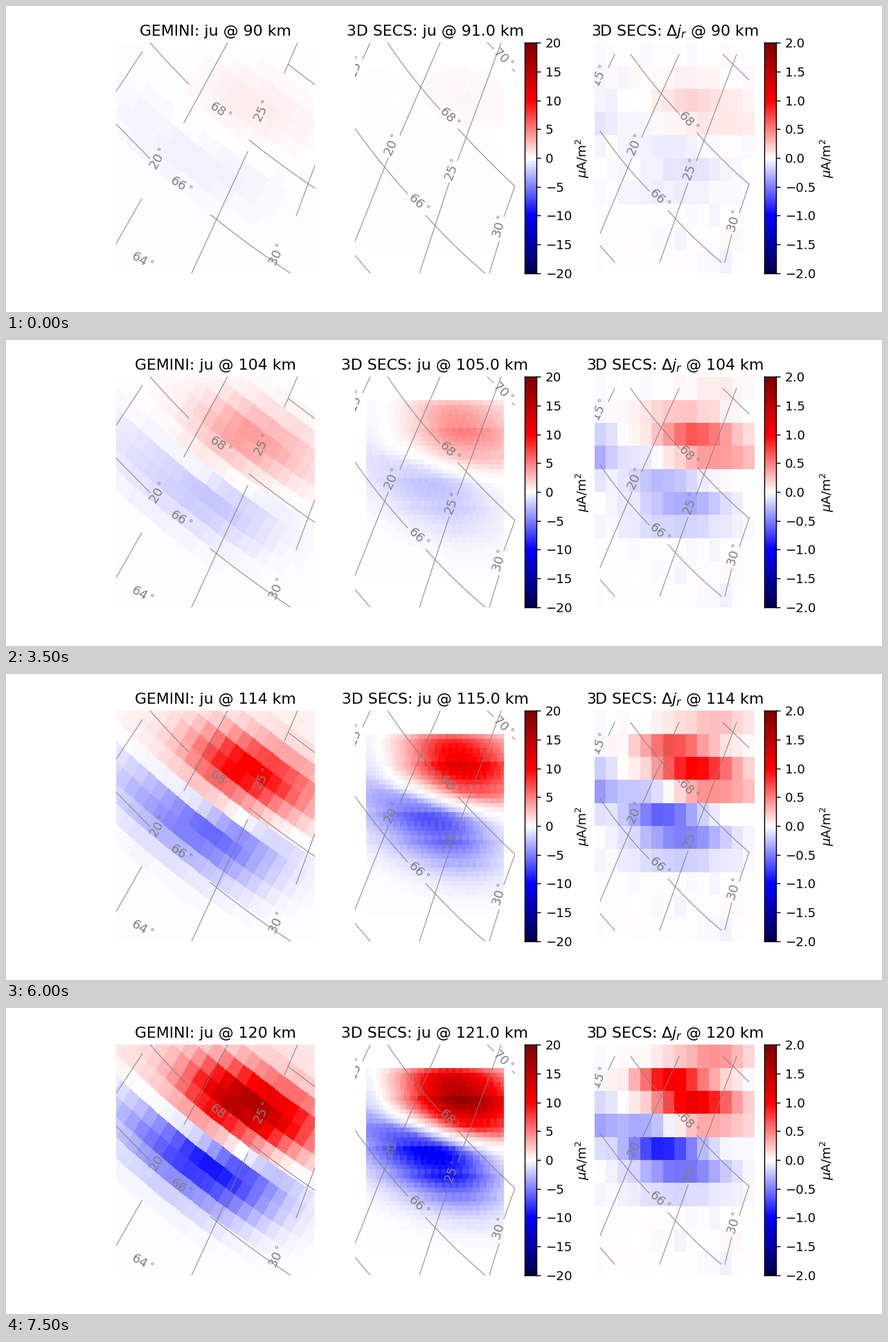
A matplotlib script for the animation above (8000 ms loop, 1265 by 443 pixels).

```python
import numpy as np
import matplotlib.pyplot as plt
from matplotlib.animation import FuncAnimation

W, H, DPI = 1265, 443, 128
FRAMES, STEP_MS = 16, 500
TOP, BOTTOM = 53.3, 386.7
GRAY = "#808080"

plt.rcParams.update({
    "font.family": "DejaVu Sans",
    "font.size": 10.3,
    "axes.linewidth": 0.83,
    "ytick.major.size": 3.62,
    "ytick.major.pad": 3.62,
    "ytick.major.width": 0.83,
})

fig = plt.figure(figsize=(W / DPI, H / DPI), dpi=DPI, facecolor="white")


def pixel_axes(x0, y0, x1, y1):
    """Axes covering a pixel box, with pixel data coordinates (y down)."""
    ax = fig.add_axes([x0 / W, 1 - y1 / H, (x1 - x0) / W, (y1 - y0) / H])
    ax.set(xlim=(x0, x1), ylim=(y1, y0))
    ax.axis("off")
    return ax


def mesh(ax, x, y, vmax):
    shape = (len(y) - 1, len(x) - 1)
    return ax.pcolormesh(x, y, np.zeros(shape), cmap="seismic",
                         vmin=-vmax, vmax=vmax, shading="flat")


def colorbar(x0, vmax, label_x):
    height = (BOTTOM - TOP) / H
    ax = fig.add_axes([x0 / W, 1 - BOTTOM / H, 16.7 / W, height])
    ax.imshow(np.arange(256)[:, None], cmap="seismic", origin="lower",
              aspect="auto", extent=(0, 1, -vmax, vmax))
    ax.set_xticks([])
    ax.yaxis.tick_right()
    ax.set_yticks(np.linspace(-vmax, vmax, 9))
    stage.text(label_x, 220, r"$\mu$A/m$^2$", rotation=90, ha="center", va="center")


def graticule(ax, lines, labels):
    """Lines through two points, or gently bent through three."""
    s = np.linspace(0, 1, 30)
    for pts in lines:
        p = np.array(pts, float)
        if len(p) == 3:
            first, second = np.hypot(*np.diff(p, axis=0).T)
            knots = [0, first / (first + second), 1]
            p = np.column_stack([np.polyval(np.polyfit(knots, c, 2), s) for c in p.T])
        ax.plot(p[:, 0], p[:, 1], color=GRAY, lw=0.55)
    for deg, x, y, angle in labels:
        ax.text(x, y, rf"{deg}$^\circ$", color=GRAY, rotation=angle,
                ha="center", va="center", clip_on=True)


def bell(d, before, after=None):
    """Gaussian, optionally with a different width on each side."""
    after = before if after is None else after
    return np.exp(-0.5 * (d / np.where(d < 0, before, after)) ** 2)


def centers(a):
    return (a[1:, 1:] + a[:-1, 1:] + a[1:, :-1] + a[:-1, :-1]) / 4


stage = pixel_axes(0, 0, W, H)
stage.set_zorder(5)
left = pixel_axes(158.5, TOP, 446, BOTTOM)
middle = pixel_axes(504, TOP, 735, BOTTOM)
right = pixel_axes(849.5, TOP, 1081, BOTTOM)

# Skewed model grid
i, j = np.meshgrid(np.arange(-18, 19), np.arange(-18, 19))
mx = 302 + 13.5 * i + 11.5 * j
my = 220 + 10.5 * i - 19.5 * j - 0.11 * i ** 2
lx, ly = centers(mx), centers(my)
left_mesh = mesh(left, mx, my, 20)

# Fine grid
fx, fy = np.meshgrid(np.linspace(519.5, 719, 41), np.linspace(87, 353, 41))
cx, cy = centers(fx), centers(fy)
mid_mesh = mesh(middle, fx, fy, 20)

# Coarse grid
right_mesh = mesh(right, np.linspace(849.5, 1081, 15), np.linspace(TOP, BOTTOM, 11), 2)
col, row = np.meshgrid(np.arange(14), np.arange(10))
noise = np.random.default_rng(4).normal(-0.01, 0.014, col.shape)


def model_field(t):
    dx, dy = lx - 345, ly - 138
    along, across = 0.92 * dx + 0.39 * dy, 0.92 * dy - 0.39 * dx
    hot = bell(along, 48 + 14 * t, 78) * bell(across, 32, 30)
    s = lx - 298
    ridge = 229 + 0.42 * s - 0.001 * s ** 2
    upper = 21 + (0.26 - 0.12 * t) * np.clip(280 - lx, 0, None)
    cold = bell(s, 120 - 35 * t, 68) * bell(ly - ridge, upper, 41)
    haze = t ** 3 * bell(ly - 55, 46)
    return (0.8 + 15.7 * t ** 2.1) * hot - (0.6 + 8.7 * t ** 2.2) * cold + haze


def fine_field(t):
    s = cx - 625
    edge = 182 + 0.34 * s - 0.0008 * s ** 2
    hot = bell(cx - 655, 40 + 10 * t, 62) * bell(cy - 130 - 0.2 * (cx - 655), 37, 34)
    hot *= np.clip((edge - cy) / 22, 0, 1)
    cold = bell(s, 75, 55) * bell(cy - 218 - 0.32 * s, 25, 41)
    cold *= np.clip((cy - edge + 4) / 18, 0, 1)
    corner = (0.25 - 0.11 * t) * bell(cx - 520, 24) * bell(cy - 150, 60, 22)
    # Steps and teeth between the coarse nodes
    phase = (cy - 127) / 36.6
    steps = 1.02 + 0.2 * (0.5 - phase % 1)
    teeth = 1 + 0.09 * (np.arange(40) % 2 - 0.5) * np.cos(2 * np.pi * phase)
    red, blue = 0.35 + 16.6 * t ** 1.8, 0.1 + 10 * t ** 2
    return (red * hot - blue * cold) * steps * teeth - blue * corner


# Column, row, widths, strength at 108 km and at 120 km
BLOBS = [
    (8.4, 2.05, 2.4, 0.6, 0.85, 1.1),
    (11, 3, 2.8, 0.5, 0.4, 0.15),
    (6, 1, 1.9, 0.45, 0.2, 0.95),
    (10, 0, 2.2, 0.45, 0.1, 0.42),
    (0, 2.7, 0.8, 0.7, -0.38, -0.25),
    (4, 3.1, 2.8, 0.45, -0.15, -0.35),
    (5.5, 4.05, 2.2, 0.42, -0.32, -0.8),
    (7.3, 5, 2.8, 0.5, -0.38, -0.48),
    (7, 6, 3.5, 0.45, -0.16, -0.07),
]


def coarse_field(t):
    gain = 0.2 + 0.8 * min(t / 0.6, 1) ** 1.5
    mix = max(t - 0.6, 0) / 0.4
    total = noise.copy()
    for c, r, wc, wr, a, b in BLOBS:
        total += (gain * a + mix * (b - a)) * bell(col - c, wc) * bell(row - r, wr)
    return total


graticule(left, [
    [(197, 66), (158, 125)], [(208, 53), (235, 83), (264, 113)],
    [(320, 53), (257, 169)], [(421, 53), (402, 97)], [(408, 85), (446, 114)],
    [(351, 194), (398, 230), (446, 264)], [(446, 231), (419, 304)],
    [(349, 211), (268, 387)], [(158, 170), (208, 221)], [(196, 279), (158, 346)],
    [(295, 302), (351, 345), (411, 387)],
], [(68, 309, 153, -35), (25, 371, 153, 63), (20, 221, 222, 60),
    (66, 252, 260, -33), (64, 196, 369, -30), (30, 393, 361, 65)])

graticule(middle, [
    [(526, 53), (515, 77)], [(551, 53), (600, 119), (627, 150)],
    [(653, 178), (690, 217), (735, 261)], [(627, 53), (569, 187)],
    [(552, 220), (504, 341)], [(695, 53), (704, 62)], [(731, 91), (735, 95)],
    [(715, 53), (652, 224)], [(640, 256), (597, 387)],
    [(504, 177), (540, 225), (580, 272)], [(606, 303), (645, 344), (692, 387)],
    [(735, 261), (719, 305)], [(712, 341), (698, 387)], [(504, 361), (526, 387)],
], [(15, 507, 89, 67), (68, 640, 162, -47), (20, 559, 202, 67), (70, 717, 76, -45),
    (25, 646, 238, 70), (66, 595, 286, -43), (30, 714, 320, 73)])

graticule(right, [
    [(879, 70), (870, 89)], [(902, 70), (948, 129), (973, 157)],
    [(998, 184), (1030, 218), (1073, 258)], [(972, 70), (918, 190)],
    [(904, 220), (858, 329)], [(1035, 70), (1073, 107)], [(1055, 70), (997, 224)],
    [(985, 256), (944, 371)], [(858, 181), (895, 230), (929, 268)],
    [(956, 296), (992, 334), (1033, 371)], [(1073, 258), (1059, 300)],
    [(1048, 331), (1038, 371)], [(858, 347), (879, 371)],
], [(15, 859, 102, 65), (68, 985, 168, -47), (20, 910, 202, 67),
    (25, 990, 238, 70), (66, 943, 279, -43), (30, 1053, 312, 73)])

colorbar(749, 20, 833)
colorbar(1095, 2, 1186)

titles = [stage.text(x, 42.5, "", ha="center", va="baseline", fontsize=12.36)
          for x in (302, 619.5, 965.5)]


def update(n):
    alt, t = 90 + 2 * n, n / (FRAMES - 1)
    left_mesh.set_array(model_field(t))
    mid_mesh.set_array(fine_field(t))
    right_mesh.set_array(coarse_field(t))
    titles[0].set_text(f"GEMINI: ju @ {alt} km")
    titles[1].set_text(f"3D SECS: ju @ {alt + 1:.1f} km")
    titles[2].set_text(rf"3D SECS: $\Delta j_r$ @ {alt} km")
    return [left_mesh, mid_mesh, right_mesh, *titles]


anim = FuncAnimation(fig, update, frames=FRAMES, interval=STEP_MS,
                     repeat=True, repeat_delay=0, blit=False)
plt.show()
```
